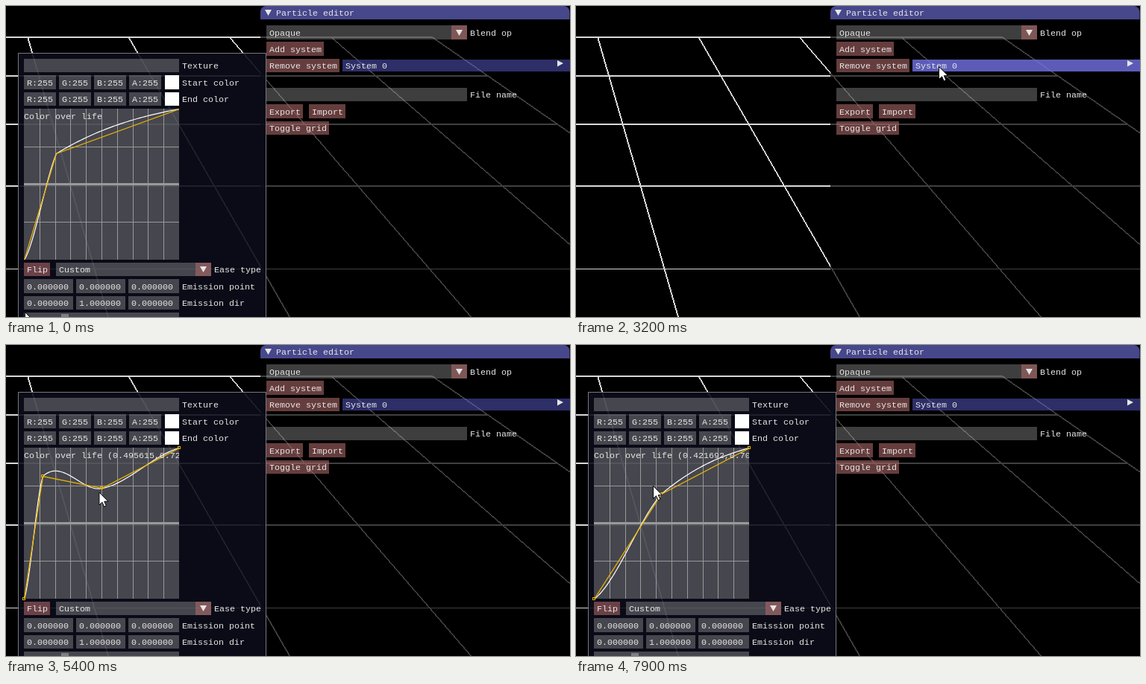
Animation of 756 by 418 pixels, one loop 8 s. Source, as an HTML page with a canvas:

```html
<!DOCTYPE html>
<html lang="en">
<head>
<meta charset="utf-8">
<title>Particle editor</title>
<style>
  html, body { margin: 0; width: 756px; height: 418px; overflow: hidden; background: #000; }
  canvas { display: block; }
</style>
</head>
<body>
<canvas id="stage" width="756" height="418"></canvas>
<script>
const ctx = document.getElementById('stage').getContext('2d');
const LOOP = 8000, STEP = 100;

const FRAME = 'rgba(204,204,204,.3)';
const BUTTON = 'rgba(171,102,102,.6)';
const TEXT = '#e6e6e6';
const ACCENT = '#e6b300';
const PLOT = { x: 24, y: 138, w: 208, h: 203 };
const HEADER = { x: 451, y: 72, w: 305, h: 16 };

// Pointer stops: time, x, y
const stops = [
  [0, 25, 411], [600, 490, 205], [800, 330, 180], [1400, 244, 150], [1900, 395, 101],
  [2200, 506, 98], [3200, 486, 81], [3700, 150, 205], [4400, 61, 191], [4700, 49, 176],
  [5200, 130, 190], [5900, 102, 228], [6200, 55, 181], [7100, 67, 263], [7400, 146, 266],
  [7800, 114, 200], [8000, 92, 178]
];

function pointer(t) {
  t = Math.max(0, t);
  const i = Math.max(1, stops.findIndex(stop => stop[0] >= t));
  const [t0, x0, y0] = stops[i - 1], [t1, x1, y1] = stops[i];
  const u = (t - t0) / (t1 - t0), k = u * u * (3 - 2 * u);
  return { x: x0 + (x1 - x0) * k, y: y0 + (y1 - y0) * k };
}

const inside = (p, r) => p.x >= r.x && p.x <= r.x + r.w && p.y >= r.y && p.y <= r.y + r.h;

// A dragged handle trails the pointer until it is released.
const dragged = (t, release) => pointer(Math.min(t, release) - 100);

function handles(t) {
  const first = t < 4500 ? { x: 67, y: 198 } : dragged(t, t < 6300 ? 4800 : LOOP);
  const list = [{ x: 24, y: 341 }, first];
  const second = dragged(t, 6000);
  if (t >= 5300 && first.x < second.x) list.push(second);
  list.push({ x: 232, y: 138 });
  return list;
}

function rect(color, x, y, w, h) {
  ctx.fillStyle = color;
  ctx.fillRect(x, y, w, h);
}

// Box around a text row, snapped outwards to whole pixels.
function row(color, x, mid, w) {
  const top = Math.floor(mid - 9);
  rect(color, x, top, w, Math.ceil(mid + 9) - top);
}

function text(str, x, mid) {
  ctx.fillStyle = TEXT;
  ctx.fillText(str, x, Math.round(mid) + 4);
}

function trace(points) {
  ctx.beginPath();
  points.forEach(p => ctx.lineTo(p[0], p[1]));
}

function line(color, width, points) {
  ctx.strokeStyle = color;
  ctx.lineWidth = width;
  trace(points);
  ctx.stroke();
}

function polygon(color, points) {
  ctx.fillStyle = color;
  trace(points);
  ctx.fill();
}

function button(label, x, mid) {
  row(BUTTON, x, mid, label.length * 7 + 7);
  text(label, x + 4, mid);
}

function field(value, x, mid, w) {
  row(FRAME, x, mid, w);
  text(value, x + 4, mid);
}

function downArrow(x, y) {
  polygon(TEXT, [[x - 4.5, y - 4], [x + 4.5, y - 4], [x, y + 4]]);
}

function combo(value, x, mid, w, label) {
  field(value, x, mid, w);
  row(BUTTON, x + w - 21, mid, 21);
  downArrow(x + w - 10.5, Math.round(mid));
  text(label, x + w + 4, mid);
}

function drawGround() {
  rect('#000', 0, 0, 756, 418);
  const color = '#d9d9d9', top = 42, spread = 0.287;
  const rayX = (i, y) => 29.3 + i * 135.4 + (y - top) * spread * (i + 1);
  for (const y of [top, 94, 159, 242]) rect(color, 0, y - 1, rayX(4, y), 2);
  rect(color, 0, 353, 756, 1);

  // Hard-edged rays: pixel pairs per row when steep, per column when flat.
  for (let i = 0; i < 5; i++) {
    const slope = spread * (i + 1), x0 = rayX(i, top);
    if (slope < 1) {
      for (let y = top; y < 418; y++) rect(color, Math.round(rayX(i, y)) - 1, y, 2, 1);
    } else {
      for (let x = Math.round(x0); x < 756; x++) {
        rect(color, x, Math.round(top + (x - x0) / slope) - 1, 1, 2);
      }
    }
  }
}

function drawEditor(hot) {
  rect('rgba(0,0,0,.7)', 341, 18, 415, 400);
  ctx.fillStyle = '#47478c';
  ctx.beginPath();
  ctx.roundRect(341, 0, 414.5, 18, [8, 8, 0, 0]);
  ctx.fill();
  downArrow(351.5, 9);
  text('Particle editor', 362, 9);

  combo('Opaque', 349, 35.5, 269, 'Blend op');
  button('Add system', 349, 57.5);
  button('Remove system', 349, 80);
  rect(hot ? 'rgba(115,115,230,.8)' : 'rgba(102,102,230,.45)', HEADER.x, HEADER.y, HEADER.w, HEADER.h);
  text('System 0', 455, 80);
  polygon(TEXT, [[739, 73], [747, 77], [739, 81.5]]);
  field('', 349, 119, 269);
  text('File name', 622, 119);
  button('Export', 349, 141.5);
  button('Import', 406, 141.5);
  button('Toggle grid', 349, 164);
}

// Uniform Catmull-Rom through the handles, ends clamped.
function smooth(points) {
  const out = [];
  const last = points.length - 1;
  for (let k = 0; k < last; k++) {
    const a = points[Math.max(0, k - 1)].y, b = points[k].y;
    const c = points[k + 1].y, d = points[Math.min(last, k + 2)].y;
    for (let i = 0; i <= 50; i++) {
      const h = i / 50;
      const y = b + 0.5 * h * (c - a + h * (2 * a - 5 * b + 4 * c - d + h * (3 * (b - c) + d - a)));
      out.push([points[k].x + (points[k + 1].x - points[k].x) * h, y]);
    }
  }
  return out;
}

function drawPlot(t, mouse) {
  const { x, y, w, h } = PLOT;
  rect(FRAME, x, y, w, h);
  for (let i = 1; i < 4; i++) {
    const thick = i === 2 ? 3 : 1;
    rect('#999', x, Math.ceil(y + h * i / 4 - 0.5) - (thick - 1) / 2, w, thick);
  }
  for (let i = 1; i < 10; i++) rect('#999', Math.round(x + w * i / 10), y, 1, h);

  const hover = inside(mouse, PLOT);
  const points = handles(t);
  ctx.save();
  ctx.beginPath();
  ctx.rect(x, y, w, h);
  ctx.clip();
  ctx.translate(0.5, 0.5);
  line('#fff', 1.2, smooth(points));
  line(ACCENT, 1.3, points.map(p => [p.x, p.y]));
  ctx.translate(-0.5, -0.5);
  const px = ((mouse.x - x) / w).toFixed(6);
  const py = (1 - (mouse.y - y) / h).toFixed(6);
  text('Color over life' + (hover ? ` (${px},${py})` : ''), x, 148);
  ctx.restore();

  if (hover) {
    ctx.strokeStyle = ACCENT;
    ctx.lineWidth = 1;
    for (const p of points) {
      ctx.strokeRect(Math.round(p.x) - 1.5, Math.round(p.y) - 1.5, 3, 3);
    }
  }
}

function drawPopup(t, mouse) {
  rect('rgba(13,13,26,.9)', 16, 63, 333, 360);
  ctx.strokeStyle = 'rgba(179,179,179,.65)';
  ctx.lineWidth = 1;
  ctx.strokeRect(16.5, 63.5, 332, 360);

  field('', 24, 80, 208);
  text('Texture', 236, 80);
  ['Start color', 'End color'].forEach((label, n) => {
    const mid = 102.5 + n * 22.5;
    [...'RGBA'].forEach((c, i) => field(c + ':255', 24 + i * 47, mid, 43));
    row('#fff', 213, mid, 19);
    text(label, 236, mid);
  });

  drawPlot(t, mouse);

  button('Flip', 24, 354);
  combo('Custom', 67, 354, 208, 'Ease type');
  ['Emission point', 'Emission dir'].forEach((label, n) => {
    const mid = 376.5 + n * 22.5;
    [0, n, 0].forEach((value, i) => field(value.toFixed(6), 24 + i * 70, mid, i < 2 ? 66 : 68));
    text(label, 236, mid);
  });
  row(FRAME, 24, 421.5, 208);
  rect('rgba(255,255,255,.3)', 74, 414, 10, 16);
  text('Emission spread', 236, 421.5);
}

function drawPointer({ x, y }) {
  const shape = [[0, 0], [0, 17], [4, 13.3], [6.6, 19.3], [9.4, 18], [6.8, 12.2], [12, 12.2], [0, 0]]
    .map(p => [x + p[0] + 0.5, y + p[1] + 0.5]);
  polygon('#fff', shape);
  line('#000', 1, shape);
}

function render(now) {
  const t = Math.floor(now % LOOP / STEP) * STEP;
  const cursor = pointer(t);
  const open = t < 2700 || t >= 3300;
  ctx.font = '11.667px "Liberation Mono", monospace';
  drawGround();
  drawEditor(!open && inside(cursor, HEADER));
  if (open) drawPopup(t, pointer(t - 60));
  drawPointer(cursor);
}

const start = performance.now();
function tick() {
  render(performance.now() - start);
  requestAnimationFrame(tick);
}
tick();
</script>
</body>
</html>
```
